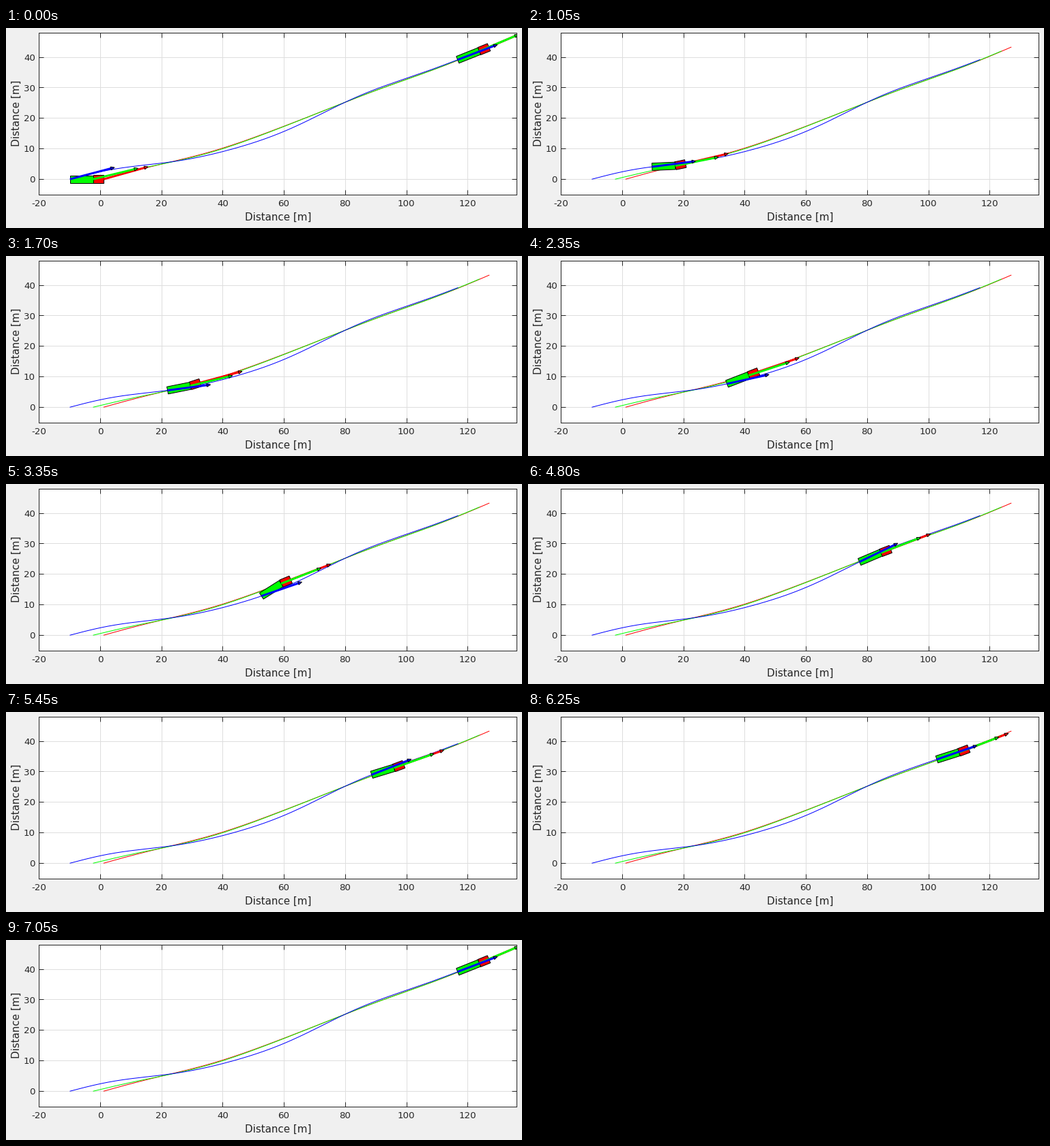
A matplotlib script that plays this animation: 756 px wide and 294 px high, repeating every 7.1 s.

```python
import matplotlib.pyplot as plt
import numpy as np
from matplotlib.animation import FuncAnimation

W, H, DPI = 756, 294, 96
FRAMES, STEP = 142, 50
LEFT, RIGHT, TOP, BOTTOM = 48.15, 748.15, 6.63, 244.63
X0, X1, Y0, Y1 = -20, 136, -5, 48
PX = (X1 - X0) / (RIGHT - LEFT)  # metres per pixel
TRAILER, TRACTOR = 7.6, 3.4
RED, GREEN, BLUE, INK = "#ff0000", "#00ff00", "#0000ff", "#262626"


class Path:
    """Straight chord from (start, 0) to end, bent by a sine series."""

    def __init__(self, start, end, *waves):
        self.start, (self.end, self.rise) = start, end
        self.waves = waves

    def __call__(self, x):
        s = (x - self.start) / (self.end - self.start)
        return self.rise * s + sum(a * np.sin(n * np.pi * s)
                                   for n, a in enumerate(self.waves, 1))

    def tangent(self, x):
        d = np.array([0.02, self(x + 0.01) - self(x - 0.01)])
        return d / np.hypot(*d)

    def linked(self, pivot, length, side):
        """Point on the path at a fixed distance from the pivot."""
        x = pivot[0] + side * length
        for _ in range(25):
            dy = self(x) - pivot[1]
            x = pivot[0] + side * np.sqrt(length**2 - dy**2)
        return np.array([x, self(x)])


rear_path = Path(-9.8, (116.8, 39.1), -5.40, -1.01, 1.04, 0.30, -0.02, 0.23)
hitch_path = Path(-2.2, (123.8, 41.9), -3.51, -0.89, -0.07, 0.30, 0.02, 0.10)
front_path = Path(1.2, (127, 43.2), -2.81, -0.63, -0.09, 0.29, 0.01, 0.10)

hx = np.linspace(hitch_path.start, hitch_path.end, 3000)
arc = np.r_[0, np.cumsum(np.hypot(np.diff(hx), np.diff(hitch_path(hx))))]


def pose(k):
    u = k / (FRAMES - 1)
    # nearly constant speed, slowing slightly
    x = np.interp(arc[-1] * (1.014 * u - 0.014 * u * u), arc, hx)
    hitch = np.array([x, hitch_path(x)])
    return (rear_path.linked(hitch, TRAILER, -1), hitch,
            front_path.linked(hitch, TRACTOR, 1))


def box(a, b, half):
    d = (b - a) / np.hypot(*(b - a))
    n = half * np.array([-d[1], d[0]])
    return [a + n, b + n, b - n, a - n]


fig = plt.figure(figsize=(W / DPI, H / DPI), dpi=DPI, facecolor="#f0f0f0")
ax = fig.add_axes([LEFT / W, 1 - BOTTOM / H,
                   (RIGHT - LEFT) / W, (BOTTOM - TOP) / H])
ax.set(xlim=(X0, X1), ylim=(Y0, Y1),
       xticks=range(-20, 121, 20), yticks=range(0, 41, 10))
ax.set_axisbelow(True)
ax.grid(color="#dedede", lw=0.75)
ax.tick_params(direction="in", length=5.2, width=0.75, color=INK,
               top=True, right=True, labelbottom=False, labelleft=False)
for spine in ax.spines.values():
    spine.set(color=INK, linewidth=0.75)


def label(x, y, s, size=10, ha="center", rotation=0):
    fig.text(x / W, 1 - y / H, s, fontsize=size, color=INK, ha=ha,
             va="baseline", family="DejaVu Sans", rotation=rotation,
             rotation_mode="anchor")


for v in ax.get_xticks():
    label(LEFT + (v - X0) / PX, 262, f"{v:.0f}".replace("\u2212", "-"))
for v in ax.get_yticks():
    label(43, BOTTOM - (v - Y0) / PX + 5, f"{v:.0f}", ha="right")
label((LEFT + RIGHT) / 2 + 0.5, 283, "Distance [m]", 11.3)
label(20, (TOP + BOTTOM) / 2, "Distance [m]", 11.3, rotation=90)

for path, color in ((front_path, RED), (hitch_path, GREEN), (rear_path, BLUE)):
    xs = np.linspace(path.start, path.end, 500)
    ax.plot(xs, path(xs), color=color, lw=0.75, zorder=3)


class Arrow:
    def __init__(self, path, color, z):
        self.path = path
        self.shaft, = ax.plot([], [], color=color, lw=2.25, zorder=z,
                              solid_capstyle="butt")
        self.head, = ax.fill([0] * 3, [0] * 3, fc=color, ec="k",
                             lw=0.7, zorder=z + 0.1)

    def place(self, start, length):
        d = self.path.tangent(start[0])
        n = np.array([-d[1], d[0]])
        tip = start + length * d
        neck = tip - 5.5 * PX * d
        self.shaft.set_data(*zip(start, neck + 1.5 * PX * d))
        self.head.set_xy([tip, neck + 2.4 * PX * n, neck - 2.4 * PX * n])


class Rig:
    def __init__(self):
        style = dict(ec="k", lw=0.75, zorder=4)
        self.tractor, = ax.fill([0] * 4, [0] * 4, fc=RED, **style)
        self.trailer, = ax.fill([0] * 4, [0] * 4, fc=GREEN, **style)
        self.arrows = [Arrow(rear_path, BLUE, 7), Arrow(hitch_path, GREEN, 6),
                       Arrow(front_path, RED, 5)]

    def place(self, k):
        points = pose(k)
        rear, hitch, front = points
        self.trailer.set_xy(box(rear, hitch, 1.2))
        self.tractor.set_xy(box(hitch, front, 1.3))
        length = 13.9 + 1.1 * np.exp(-k * STEP / 1200)
        for arrow, p in zip(self.arrows, points):
            arrow.place(p, length)

    def show(self, on):
        parts = [self.tractor, self.trailer]
        for arrow in self.arrows:
            parts += [arrow.shaft, arrow.head]
        for part in parts:
            part.set_visible(on)


parked, rig = Rig(), Rig()
parked.place(FRAMES - 1)


def update(k):
    # the finished run lingers while the next one starts
    parked.show(k == 0)
    rig.place(k)
    return []


anim = FuncAnimation(fig, update, frames=FRAMES, interval=STEP,
                     init_func=lambda: [], repeat=True, repeat_delay=0)
plt.show()
```
